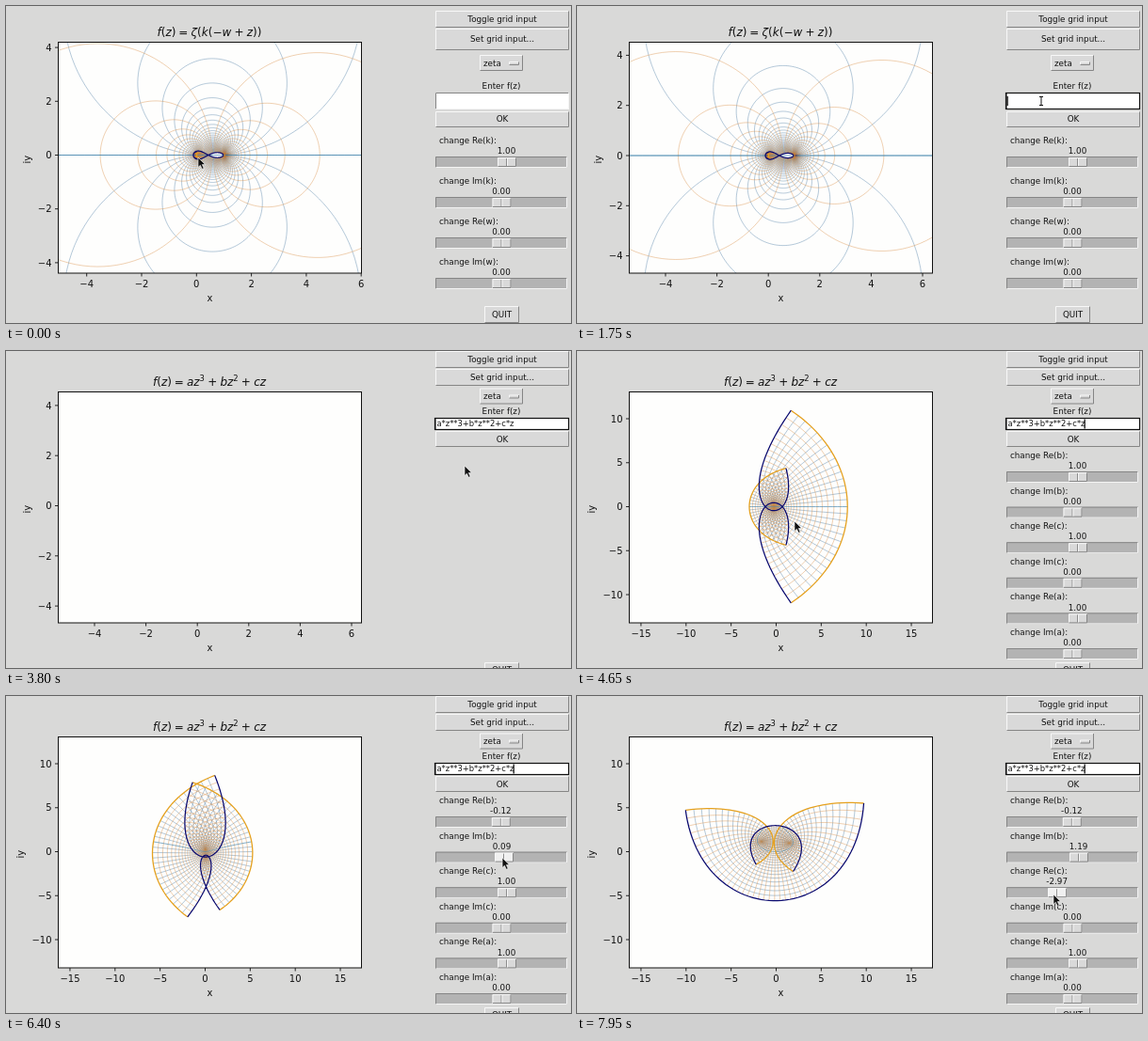
An HTML page with a canvas for the animation above (8 s loop, 600 by 337 pixels).

```html
<!DOCTYPE html>
<html lang="en">
<head>
<meta charset="utf-8">
<title>Complex function grid plotter</title>
<style>
html, body { margin: 0; width: 100%; height: 100%; overflow: hidden; background: #d9d9d8; }
canvas, svg { position: absolute; left: 0; top: 0; width: 600px; height: 337px; }
svg text { font-family: "DejaVu Sans", Verdana, sans-serif; font-size: 8.75px; fill: #111; white-space: pre; }
svg .tick { font-size: 10px; }
svg .title { font-size: 12px; }
svg .entry { font-size: 8.35px; }
.i { font-style: italic; }
.sup { font-size: 8.4px; }
</style>
</head>
<body>
<canvas id="plot" width="600" height="337"></canvas>
<svg id="ui" viewBox="0 0 600 337"></svg>
<script>
const LOOP = 8000, PI = Math.PI;
const LEFT = 55.5, RIGHT = 377.5;
const LABEL_LAG = 82; // slider read-outs trail the handles
const ctx = document.getElementById('plot').getContext('2d');
const ui = document.getElementById('ui');

// ---- time tracks: rows of [time, ...values] ----
function track(t, rows, ease = true) {
  if (t <= rows[0][0]) return rows[0].slice(1);
  for (let n = 1; n < rows.length; n++) {
    const a = rows[n - 1], b = rows[n];
    if (t > b[0]) continue;
    let p = (t - a[0]) / (b[0] - a[0]);
    if (ease) p = p * p * (3 - 2 * p);
    return a.slice(1).map((v, k) => v + (b[k + 1] - v) * p);
  }
  return rows[rows.length - 1].slice(1);
}

// views: x origin, x scale, y origin, y scale
const ZETA_VIEW = [[50, 202.3, 29.15, 158.5, 28.6], [1500, 203.2, 27.3, 159, 26.65]];
const POLY_VIEW = [[3850, 203.2, 27.3, 164.5, 26.65], [4600, 211.5, 9.57, 165.5, 9.35]];
const RE_B = [[5370, 1], [5610, -2.26], [5740, -2.26], [6200, -0.12]];
const IM_B = [[6300, 0], [6800, 2.27], [7050, 3.4], [7100, 3.4], [7350, 1.19]];
const RE_C = [[7450, 1], [7880, -2.98]];
const POINTER = [
  [500, 204, 161], [900, 440, 128], [1500, 493, 101], [1750, 493, 101],
  [2150, 204, 158], [2500, 224, 115], [3050, 224, 115], [3180, 360, 60],
  [3350, 515, 118], [3600, 515, 118], [3780, 487, 122], [3950, 487, 122],
  [4500, 231, 181], [4800, 231, 181], [5350, 533, 135], [5610, 516, 135],
  [5740, 516, 135], [6200, 527, 135], [6300, 526, 172], [6800, 536, 172],
  [7050, 542, 172], [7100, 542, 172], [7350, 531, 172], [7450, 529, 211],
  [7880, 506, 211]
];

// ---- complex functions, results as [re, im] ----
const TERMS = 28;
const partial = [], logs = [];
for (let k = 0, term = 1, sum = 0; k <= TERMS; k++) {
  sum += term;
  partial.push(sum);
  logs.push(Math.log(k + 1));
  term *= 4 * (TERMS + k) * (TERMS - k) / ((2 * k + 1) * (2 * k + 2));
}

function zeta(x, y) {
  let re = 0, im = 0;
  for (let k = 0; k < TERMS; k++) {
    const m = (k % 2 ? -1 : 1) * (1 - partial[k] / partial[TERMS]) * Math.exp(-x * logs[k]);
    re += m * Math.cos(y * logs[k]);
    im -= m * Math.sin(y * logs[k]);
  }
  const p = Math.pow(2, 1 - x), a = y * Math.LN2;
  const dr = 1 - p * Math.cos(a), di = p * Math.sin(a), d = dr * dr + di * di;
  return [(re * dr + im * di) / d, (im * dr - re * di) / d];
}

function cubic(br, bi, c) {
  return (x, y) => {
    const sr = x * x - y * y, si = 2 * x * y;
    return [
      sr * x - si * y + br * sr - bi * si + c * x,
      sr * y + si * x + br * si + bi * sr + c * y
    ];
  };
}

// ---- image of a rectangular grid ----
function spread(half, pole, n) {
  const out = [];
  const lo = Math.asinh((-half - pole) / 0.1), hi = Math.asinh((half - pole) / 0.1);
  for (let k = 0; k <= n; k++) out.push(pole + 0.1 * Math.sinh(lo + (hi - lo) * k / n));
  return out;
}
function even(half, n) {
  return Array.from({ length: n + 1 }, (_, k) => -half + 2 * half * k / n);
}

function net(f, xs, ys, xLines, yLines) {
  const g = { blue: new Path2D(), orange: new Path2D(), axis: new Path2D(),
              sides: new Path2D(), caps: new Path2D() };
  const add = (path, pts) => pts.forEach((p, k) => k ? path.lineTo(p[0], p[1]) : path.moveTo(p[0], p[1]));
  yLines.forEach((y, k) => {
    const edge = k === 0 || k === yLines.length - 1;
    const path = edge ? g.caps : Math.abs(y) < 1e-9 ? g.axis : g.blue;
    add(path, xs.map(x => f(x, y)));
  });
  xLines.forEach((x, k) => {
    const edge = k === 0 || k === xLines.length - 1;
    add(edge ? g.sides : g.orange, ys.map(y => f(x, y)));
  });
  return g;
}

const zetaNet = net(zeta, spread(2 * PI, 1, 200), spread(PI, 0, 180),
  even(2 * PI, 100).filter(x => Math.abs(x - 1) > 0.02), even(PI, 68));
const polyX = even(PI / 2, 60), polyY = even(PI / 3, 44);
const polyXLines = even(PI / 2, 45), polyYLines = even(PI / 3, 30);

function drawPlot(view, top, bottom, g) {
  ctx.setTransform(1, 0, 0, 1, 0, 0);
  ctx.clearRect(0, 0, 600, 337);
  ctx.fillStyle = '#fefefd';
  ctx.fillRect(LEFT, top, RIGHT - LEFT, bottom - top);
  if (!g) return;
  const [x0, sx, y0, sy] = view;
  ctx.save();
  ctx.beginPath();
  ctx.rect(LEFT, top, RIGHT - LEFT, bottom - top);
  ctx.clip();
  ctx.setTransform(sx, 0, 0, -sy, x0, y0);
  ctx.lineJoin = 'round';
  const stroke = (path, color, w) => {
    ctx.strokeStyle = color;
    ctx.lineWidth = w / sx;
    ctx.stroke(path);
  };
  stroke(g.blue, 'rgba(70,120,160,.55)', 0.75);
  stroke(g.orange, 'rgba(215,140,65,.55)', 0.75);
  stroke(g.axis, 'rgba(70,135,175,.8)', 0.85);
  stroke(g.sides, '#e5a11f', 1.3);
  stroke(g.caps, '#08086e', 1.25);
  ctx.restore();
}

// ---- interface pieces ----
const rect = (x, y, w, h, fill, more = '') =>
  `<rect x="${x}" y="${y}" width="${w}" height="${h}" fill="${fill}" ${more}/>`;
const line = (d, color, w = 1) => `<path d="${d}" fill="none" stroke="${color}" stroke-width="${w}"/>`;
const text = (x, y, s, cls = '', anchor = 'middle') =>
  `<text x="${x}" y="${y}" class="${cls}" text-anchor="${anchor}">${s}</text>`;

function relief(x, y, w, h, fill, sunken) {
  const r = x + w - 0.5, b = y + h - 0.5, l = x + 0.5, t = y + 0.5;
  const lit = sunken ? '#858585' : '#f8f8f8', dark = sunken ? '#f4f4f4' : '#858585';
  return rect(x, y, w, h, fill) + line(`M${l} ${b}V${t}H${r}`, lit) + line(`M${l} ${b}H${r}V${t}`, dark);
}
const button = (x, y, w, h, label, base, fill = '#d9d9d9', sunken = false) =>
  relief(x, y, w, h, fill, sunken) + text(x + w / 2, base, label);

function slider(name, value, shown, y, active) {
  const mid = 526.5 + 5.5 * value;
  return text(460, y - 20, `change ${name}:`, '', 'start') +
    text(526 + 5.5 * shown, y - 8.8, shown.toFixed(2)) +
    relief(456, y - 6, 140, 12, '#b3b3b3', true) +
    relief(mid - 10, y - 5, 20, 10, active ? '#f0f0f0' : '#d9d9d9') +
    line(`M${mid - 0.5} ${y - 4}V${y + 4}`, '#8c8c8c') + line(`M${mid + 0.5} ${y - 4}V${y + 4}`, '#f6f6f6');
}

const it = s => `<tspan class="i">${s}</tspan>`;
const sup = s => `<tspan class="sup" dy="-4.5">${s}</tspan>`;
const plus = dy => `<tspan dx="3.2" dy="${dy}">+</tspan>`;
const after = s => `<tspan class="i" dx="3.2">${s}</tspan>`;
const HEAD = `${it('f')}(${it('z')})<tspan dx="2.8">=</tspan>`;
const ZETA_TITLE = `${HEAD}${after('ζ')}(${it('k')}(−${it('w')}${plus(0)}${after('z')}))`;
const POLY_TITLE = `${HEAD}${after('az')}${sup(3)}${plus(4.5)}${after('bz')}${sup(2)}${plus(4.5)}${after('cz')}`;

function axes([x0, sx, y0, sy], top, bottom, title) {
  const step = sx > 17 ? 2 : 5;
  const name = v => String(v).replace('-', '−');
  let s = '';
  for (let v = Math.ceil((LEFT - x0) / sx / step) * step; x0 + v * sx <= RIGHT + 0.3; v += step) {
    const x = x0 + v * sx;
    s += line(`M${x} ${bottom}v3.5`, '#111', 0.9) + text(x, bottom + 15, name(v), 'tick');
  }
  for (let v = Math.ceil((y0 - bottom) / sy / step) * step; y0 - v * sy >= top; v += step) {
    const y = y0 - v * sy;
    s += line(`M${LEFT} ${y}h-3.5`, '#111', 0.9) + text(48.5, y + 3.7, name(v), 'tick', 'end');
  }
  const ix = step === 5 ? 19 : 26, iy = (top + bottom) / 2 + 2;
  return s + rect(LEFT, top, RIGHT - LEFT, bottom - top, 'none', 'stroke="#111" stroke-width="1"') +
    text(216.5, bottom + 29.5, 'x', 'tick') +
    `<text class="tick" text-anchor="middle" transform="translate(${ix} ${iy}) rotate(-90)">iy</text>` +
    text(216, top - 7, title, 'title');
}

function pointer(x, y, beam) {
  if (beam) return line(`M${x - 2} ${y - 4.5}h4M${x} ${y - 4.5}v9M${x - 2} ${y + 4.5}h4`, '#111');
  return `<path d="M${x} ${y}v10.5l2.4-2.2 1.8 4 1.9-.9-1.8-3.8h3.3z" fill="#111" stroke="#fff" stroke-width=".6"/>`;
}

function entry(t, y, h) {
  const typed = t >= 3100, focus = t >= 1650;
  const caret = focus && (t - 470) % 900 < 600;
  let s = relief(456, y, 142, h, '#fff', true);
  if (focus) s += rect(455.5, y + 0.5, 142, h - 1, 'none', 'stroke="#111" stroke-width="1.2"');
  if (typed) s += text(457.5, y + h / 2 + 2.8, 'a*z**3+b*z**2+c*z', 'entry', 'start');
  if (caret) s += rect(typed ? 538.5 : 456.5, y + h / 2 - 5, 1.3, 10, '#111');
  return s;
}

function menu(y) {
  return relief(503, y, 46, 17, '#d9d9d9') + text(507, y + 11.8, 'zeta', '', 'start') +
    relief(534, y + 7, 11, 4, '#d9d9d9');
}

const sliders = t => [track(t, RE_B)[0], track(t, IM_B, false)[0], track(t, RE_C)[0], 0, 1, 0];

function render(t) {
  const poly = t >= 3700, top = poly ? 43.5 : 38.5, bottom = top + 245.5;
  const view = track(t, poly ? POLY_VIEW : ZETA_VIEW);
  const ready = t >= 3850;
  const values = sliders(t), shown = sliders(t - LABEL_LAG);
  const g = !poly ? zetaNet
    : ready ? net(cubic(...values), polyX, polyY, polyXLines, polyYLines) : null;
  drawPlot(view, top, bottom, g);

  const [px, py] = track(t, POINTER);
  let s = axes(view, top, bottom, poly ? POLY_TITLE : ZETA_TITLE);
  if (!poly) {
    const hover = t >= 3320, press = t >= 3500 && t < 3600;
    s += button(456, 5, 142, 18, 'Toggle grid input', 16.7) +
      button(456, 24, 142, 23, 'Set grid input...', 38.3) +
      menu(52) + text(526, 88.3, 'Enter f(z)') + entry(t, 92, 18) +
      button(456, 112, 142, 17, 'OK', 123.4, hover ? '#ececec' : '#d9d9d9', press);
    ['Re(k)', 'Im(k)', 'Re(w)', 'Im(w)'].forEach((n, k) => {
      const v = k ? 0 : 1;
      s += slider(n, v, v, 166 + 43 * k, false);
    });
    s += button(508, 319, 37, 18, 'QUIT', 331);
  } else {
    s += button(456, 0, 142, 18, 'Toggle grid input', 11.7) +
      button(456, 19, 142, 18, 'Set grid input...', 31.2) +
      menu(39.5) + text(526, 67.3, 'Enter f(z)') + entry(t, 71, 13) +
      button(456, 85, 142, 17, 'OK', 96.6) +
      button(508, 331, 37, 18, 'QUIT', 341.5);
    if (ready) {
      ['Re(b)', 'Im(b)', 'Re(c)', 'Im(c)', 'Re(a)', 'Im(a)'].forEach((n, k) => {
        const y = 134 + 37.6 * k;
        const over = Math.abs(py - y) < 6 && Math.abs(px - 526.5 - 5.5 * values[k]) < 11;
        s += slider(n, values[k], shown[k], y, over);
      });
    }
  }
  const beam = !poly && px > 456 && py > 92 && py < 110;
  ui.innerHTML = s + pointer(px, py, beam);
}

const start = performance.now();
function frame() {
  render((performance.now() - start) % LOOP);
  requestAnimationFrame(frame);
}
frame();
</script>
</body>
</html>
```
